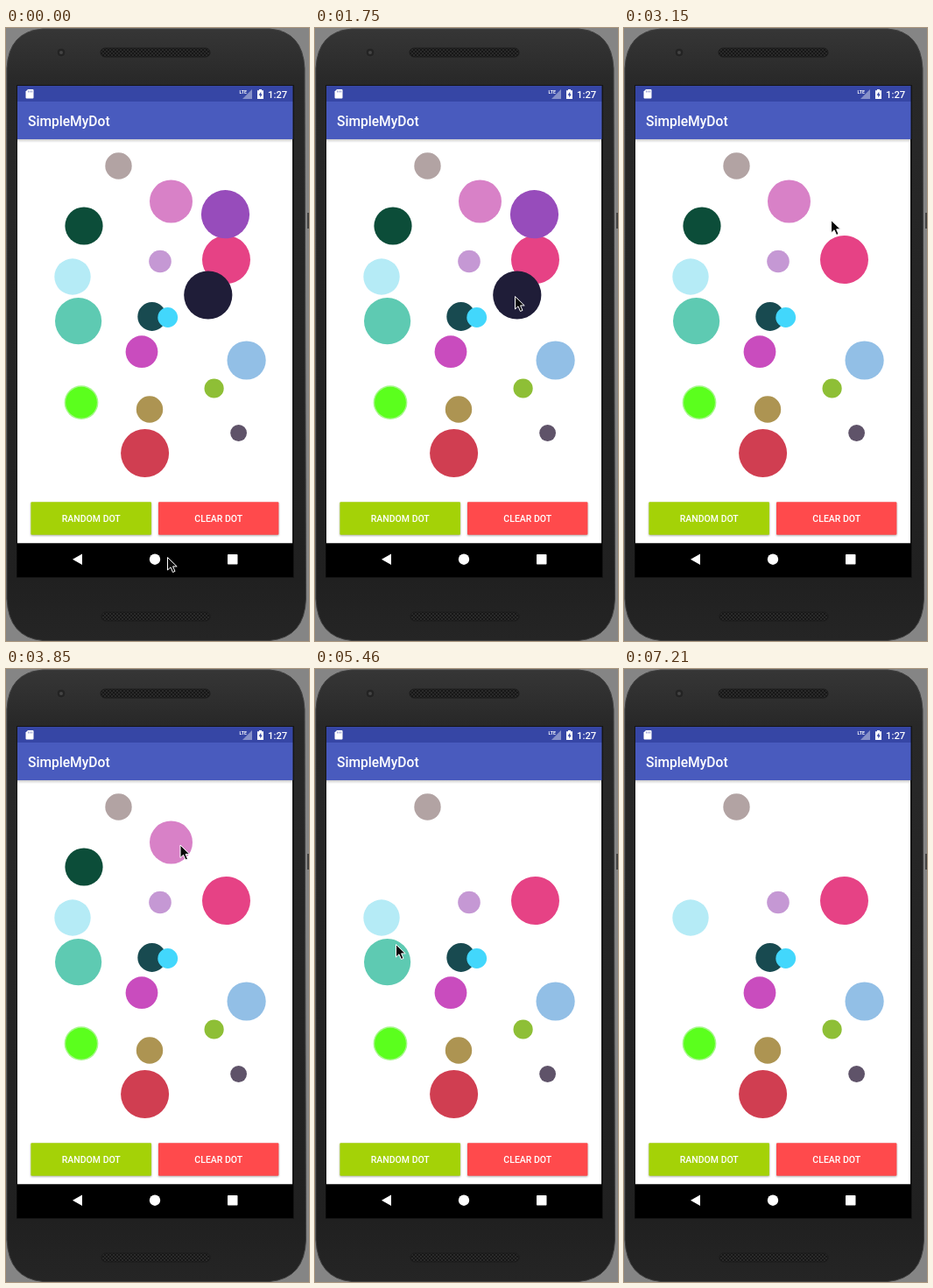
These frames come from a looping animation (346x700 px, 7.28 s). An HTML page:

```html
<!DOCTYPE html>
<html lang="en">
<head>
<meta charset="utf-8">
<title>Tap the dots</title>
<style>
  html, body { margin: 0; width: 100%; height: 100%; overflow: hidden; background: #858585; }
  svg { display: block; width: 346px; height: 700px; }
  text { fill: #fff; font-family: Roboto, "Liberation Sans", sans-serif; font-weight: 500; }
  #buttons rect { filter: drop-shadow(0 1px 1px #0005); }
</style>
</head>
<body>
<svg viewBox="0 0 346 700">
  <defs>
    <linearGradient id="body" x2="0" y2="1">
      <stop offset="0" stop-color="#363636"/>
      <stop offset=".09" stop-color="#282828"/>
      <stop offset=".9" stop-color="#202020"/>
      <stop offset="1" stop-color="#252525"/>
    </linearGradient>
    <linearGradient id="shade" x2="0" y2="1">
      <stop offset="0" stop-color="#000" stop-opacity=".2"/>
      <stop offset="1" stop-color="#000" stop-opacity="0"/>
    </linearGradient>
    <pattern id="mesh" width="4" height="4" patternUnits="userSpaceOnUse">
      <rect width="4" height="4" fill="#2a2a2a"/>
      <circle cx="1" cy="1" r="1" fill="#101010"/>
      <circle cx="3" cy="3" r="1" fill="#101010"/>
    </pattern>
  </defs>

  <!-- phone -->
  <rect x="344" y="211" width="2" height="18" fill="#444"/>
  <path d="M1 46Q3 4 42 1H301Q339 4 341 46L342.500 652Q341 696 301 699.500H42Q3 696 1 652Z"
        fill="url(#body)" stroke="#404040"/>
  <circle cx="63" cy="28" r="5" fill="#232323" stroke="#333"/>
  <circle cx="63" cy="28" r="2" fill="#444"/>
  <rect x="108" y="23" width="125" height="10" rx="5" fill="url(#mesh)" stroke="#1b1b1b"/>
  <rect x="109" y="667" width="124" height="10" rx="5" fill="url(#mesh)" stroke="#1b1b1b"/>

  <!-- screen -->
  <rect x="12" y="65" width="317" height="563" fill="#151515"/>
  <rect x="13" y="127" width="314" height="461.5" fill="#fff"/>
  <rect x="13" y="66" width="314.500" height="18" fill="#3646a5"/>
  <rect x="13" y="84" width="314.500" height="43" fill="#495bbe"/>
  <rect x="13" y="127" width="314" height="4" fill="url(#shade)"/>
  <rect x="12.5" y="588.5" width="315.5" height="38.5" fill="#000"/>

  <!-- status bar -->
  <path d="M25 70H30.5Q31.500 70 31.500 71V79.500Q31.500 80.500 30.500 80.500H23.500Q22.500 80.500 22.500 79.500V72.500Z" fill="#fff"/>
  <path d="M25.500 71.500V73.500M27.500 71.500V73.500M29.500 71.500V73.500" stroke="#3646a5" stroke-width=".6"/>
  <path d="M281 70V81H270Z" fill="#8791c9"/>
  <text x="266.500" y="75" font-size="5.200" style="font-weight:700">LTE</text>
  <path d="M287 71.300H289V70H292V71.300H294V81H287Z" fill="#fff"/>
  <path d="M291.200 72.800L288.600 76.800H290.300V79.500L292.700 75.600H291.200Z" fill="#3646a5"/>
  <text x="299" y="79.500" font-size="11.300">1:27</text>
  <text x="25" y="111.500" font-size="15.600">SimpleMyDot</text>

  <g id="dots"></g>
  <g id="buttons"></g>

  <!-- navigation -->
  <path d="M87 600.500V613L76 606.700Z" fill="#fff"/>
  <circle cx="170" cy="606.700" r="6.200" fill="#fff"/>
  <rect x="253" y="601" width="11.500" height="11.500" rx=".7" fill="#fff"/>

  <path id="cursor" d="M.5 .5V15L4 11.800L6.500 17.500L9 16.400L6.600 10.900H11.200Z"
        fill="#080808" stroke="#fff" stroke-width="1"/>
</svg>
<script>
const LOOP = 7280, STEP = 70;
const $ = id => document.getElementById(id);

function add(parent, tag, attrs, text = "") {
  const el = document.createElementNS("http://www.w3.org/2000/svg", tag);
  for (const key in attrs) el.setAttribute(key, attrs[key]);
  el.textContent = text;
  return parent.appendChild(el);
}

// pale halo behind the bright green dot
add($("dots"), "circle", { cx: 86, cy: 427.7, r: 19.4, fill: "#a6f78a" });

// x, y, radius, colour, time of the tap that removes it
const dots = [
  [128.5, 157.5, 15.2, "#b2a3a3"],
  [188.5, 198, 24.5, "#d881c7", 4060],
  [251.5, 264.5, 27.5, "#e64285"],
  [250.5, 212.7, 27.6, "#974cbb", 2870],
  [89, 226, 21.6, "#0c4d39", 5040],
  [176, 266.5, 12.8, "#c598d4"],
  [76, 284, 20.7, "#b5ebf6"],
  [230.8, 305, 27.6, "#1f1d38", 1960],
  [82.6, 334.6, 26.6, "#5ecab2", 5740],
  [166.7, 329.5, 16.4, "#184a50"],
  [184.7, 330.5, 11.4, "#42d7fc"],
  [155, 369.7, 18.4, "#c94cbe"],
  [274.6, 379.5, 22.1, "#92bfe6"],
  [237.6, 411.5, 11.1, "#8ebf36"],
  [86, 427.7, 17.9, "#5bff1d"],
  [164, 435.5, 15.2, "#ad9452"],
  [265.6, 462.5, 9.4, "#5f5369"],
  [158.6, 485.5, 27.5, "#d03e51"]
].map(([cx, cy, r, fill, end = LOOP]) =>
  ({ el: add($("dots"), "circle", { cx, cy, r, fill }), end }));

function button(x, width, fill, label) {
  add($("buttons"), "rect", { x, y: 541.3, width, height: 37.4, rx: 1, fill });
  add($("buttons"), "text",
    { x: x + width / 2, y: 564, "font-size": 10.5, "text-anchor": "middle" }, label);
}
button(28.4, 137.6, "#a4d207", "RANDOM DOT");
button(174, 137.4, "#ff4a4c", "CLEAR DOT");

// time, x, y
const path = [
  [0, 184, 604], [350, 184, 604], [1260, 228, 306], [2030, 228, 306],
  [2450, 253.5, 227.5], [2940, 253.5, 227.5], [3500, 198.5, 200.5], [4340, 198.5, 200.5],
  [4830, 92, 224], [5110, 92, 224], [5390, 92, 314], [5950, 92, 314],
  [7140, 150, 702], [LOOP, 150, 702]
];
const ease = p => p * p * (3 - 2 * p);

function cursorAt(t) {
  const i = path.findIndex(k => k[0] > t);
  const [t0, x0, y0] = path[i - 1], [t1, x1, y1] = path[i];
  const p = ease((t - t0) / (t1 - t0));
  return [x0 + (x1 - x0) * p, y0 + (y1 - y0) * p];
}

const start = performance.now();
function draw() {
  const elapsed = (performance.now() - start) % LOOP;
  const t = Math.floor(elapsed / STEP) * STEP;
  for (const { el, end } of dots) el.style.display = t < end ? "" : "none";
  $("cursor").setAttribute("transform", `translate(${cursorAt(t)})`);
  requestAnimationFrame(draw);
}
draw();
</script>
</body>
</html>
```
